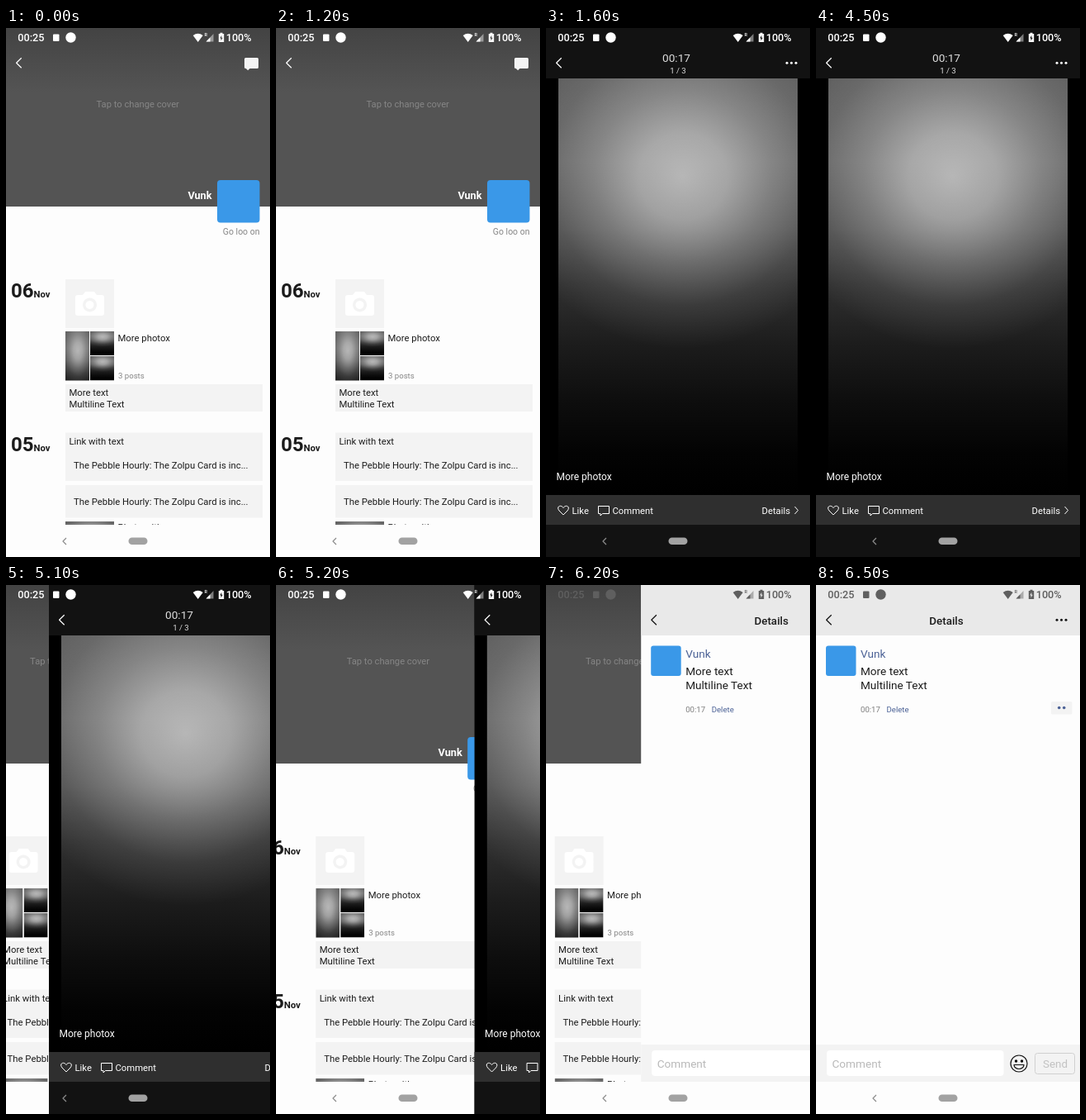
These frames come from a looping animation (320 px wide and 640 px high, 8000 ms). An HTML page:

```html
<!DOCTYPE html>
<html lang="en">
<head>
<meta charset="utf-8">
<title>Album, photo and details</title>
<style>
  html, body { margin: 0; width: 100%; height: 100%; overflow: hidden; background: #fdfdfd; }
  svg { display: block; }
  #stage { width: 100vw; height: 100vh; }
  text { font: 11.3px Roboto, "Liberation Sans", sans-serif; fill: #1c1c1c; }
  .line { fill: none; stroke: currentColor; stroke-width: 1.2; stroke-linejoin: round; }
  .thin { stroke-width: 1; }
  .mid { text-anchor: middle; }
  .end { text-anchor: end; }
  .day { font-size: 24px; font-weight: 700; }
  .month { font-weight: 700; }
  .large { font-size: 13.6px; }
  .small { font-size: 9.6px; }
  .tile { fill: #f3f3f3; }
  .avatar { fill: #3a98e8; }
  .light text { fill: #fff; }
  #status text { font-size: 12.7px; font-weight: 500; fill: currentColor; }
</style>
</head>
<body>
<svg id="stage" viewBox="0 0 320 640">
  <defs>
    <linearGradient id="cover" x2="0" y2="1">
      <stop stop-color="#434343"/>
      <stop offset=".36" stop-color="#545454"/>
    </linearGradient>
    <linearGradient id="fade" x2="0" y2="1">
      <stop stop-color="#5c5c5c"/>
      <stop offset=".2" stop-color="#5e5e5e"/>
      <stop offset=".36" stop-color="#4c4c4c"/>
      <stop offset=".5" stop-color="#303030"/>
      <stop offset=".64" stop-color="#1c1c1c"/>
      <stop offset=".78" stop-color="#0d0d0d"/>
      <stop offset=".9" stop-color="#030303"/>
      <stop offset="1" stop-color="#000"/>
    </linearGradient>
    <radialGradient id="glow" cx=".52" cy=".42" r=".74" gradientTransform="scale(1 .56)">
      <stop stop-color="#fff" stop-opacity=".56"/>
      <stop offset=".25" stop-color="#fff" stop-opacity=".46"/>
      <stop offset=".5" stop-color="#fff" stop-opacity=".25"/>
      <stop offset=".75" stop-color="#fff" stop-opacity=".08"/>
      <stop offset="1" stop-color="#fff" stop-opacity="0"/>
    </radialGradient>
    <symbol id="photo" viewBox="0 0 100 100" preserveAspectRatio="none">
      <rect width="100" height="100" fill="url(#fade)"/>
      <rect width="100" height="100" fill="url(#glow)"/>
    </symbol>
    <path id="back" class="line" d="M18.7 36.2 12.6 42.2l6.100 6"/>
    <g id="more" fill="currentColor">
      <circle cx="292" cy="42.2" r="1.5"/><circle cx="297.500" cy="42.2" r="1.5"/><circle cx="303" cy="42.2" r="1.5"/>
    </g>
    <clipPath id="content"><path d="M0 0H320V601H0z"/></clipPath>
  </defs>

  <g id="album">
    <rect width="320" height="640" fill="#fdfdfd"/>
    <g clip-path="url(#content)">
      <rect width="320" height="216" fill="url(#cover)"/>
      <g class="light" color="#fff">
        <use href="#back"/>
        <path fill="#f4f4f4" d="M290.5 36h14q1.5 0 1.5 1.5v10q0 1.5-1.5 1.5h-9l-2.3 2.3-2.3-2.3h-.4q-1.5 0-1.5-1.5v-10q0-1.5 1.5-1.5z"/>
        <text class="mid" x="159.7" y="96" style="font-size:11.2px;fill:#868686">Tap to change cover</text>
        <text class="end" x="249.5" y="207" style="font-size:12.7px;font-weight:700">Vunk</text>
      </g>
      <rect class="avatar" x="256" y="184" width="51.5" height="51.5" rx="4"/>
      <text class="end" x="307.5" y="250" style="font-size:10.5px;fill:#858585">Go loo on</text>

      <text class="day" x="6" y="326">06</text><text class="month" x="33.5" y="326">Nov</text>
      <rect class="tile" x="72" y="304" width="59" height="59"/>
      <path fill="#fff" fill-rule="evenodd" d="M87 323h6l3-4h11l3 4h6q3 0 3 3v19q0 3-3 3H87q-3 0-3-3v-19q0-3 3-3zm14.5 3.5a8.500 8.500 0 1 0 .1 0zm0 3.5a5 5 0 1 1-.1 0z"/>
      <svg x="72" y="367" width="29" height="59.5"><use href="#photo" width="29" height="100"/></svg>
      <use href="#photo" x="102" y="367" width="29" height="29"/>
      <use href="#photo" x="102" y="397" width="29" height="29.5"/>
      <text x="135.5" y="379">More photox</text>
      <text class="small" x="136" y="424" style="fill:#858585">3 posts</text>
      <rect class="tile" x="72" y="431" width="239" height="33"/>
      <text x="76.5" y="444.5">More text</text><text x="76.5" y="458.5">Multiline Text</text>

      <text class="day" x="6" y="512">05</text><text class="month" x="33.5" y="512">Nov</text>
      <rect class="tile" x="72" y="489.5" width="239" height="58.5"/>
      <text x="76.5" y="503.5">Link with text</text>
      <text x="82" y="533">The Pebble Hourly: The Zolpu Card is inc...</text>
      <rect class="tile" x="72" y="553" width="239" height="39.5"/>
      <text x="82" y="577">The Pebble Hourly: The Zolpu Card is inc...</text>
      <use href="#photo" x="72" y="597" width="59" height="59"/>
      <text x="135.5" y="608">Photo with</text>
    </g>
  </g>

  <g id="viewer" class="light" color="#fff">
    <rect width="320" height="640"/>
    <rect width="320" height="61" fill="#121212"/>
    <use href="#back"/><use href="#more"/>
    <text class="mid" x="158" y="41" style="font-size:13.6px;fill:#ddd">00:17</text>
    <text class="mid small" x="160" y="55" style="fill:#ddd">1 / 3</text>
    <use href="#photo" x="15" y="61" width="290" height="504"/>
    <text x="12.5" y="547" style="font-size:12px">More photox</text>
    <rect y="565" width="320" height="36" fill="#2f2f2f"/>
    <path class="line thin" d="M21 589l-5-5c-4-5 2-8 5-3.500 3-4.500 9-1.500 5 3.500z"/>
    <text x="31.5" y="587.5">Like</text>
    <path class="line thin" d="M63.5 578.5h13v9h-8l-2.5 2.5v-2.5h-2.5z"/>
    <text x="80.5" y="587.5">Comment</text>
    <text x="261.5" y="587.5">Details</text>
    <path class="line thin" d="M301.5 579l4 4.5-4 4.5"/>
    <rect y="601" width="320" height="39" fill="#121212"/>
  </g>

  <g id="details" color="#111">
    <rect width="320" height="640" fill="#fdfdfd"/>
    <rect width="320" height="61" fill="#e9e9e9"/>
    <use href="#back"/><use href="#more"/>
    <text class="mid" x="158" y="47.5" style="font-size:13.4px;font-weight:500">Details</text>
    <rect class="avatar" x="12" y="73.5" width="36.5" height="36.5" rx="3"/>
    <text class="large" x="54" y="88" style="fill:#4c6296">Vunk</text>
    <text class="large" x="54" y="108.5">More text</text><text class="large" x="54" y="126">Multiline Text</text>
    <text class="small" x="54" y="154" style="fill:#7c7c7c">00:17</text>
    <text class="small" x="85.5" y="154" style="fill:#4c6296">Delete</text>
    <rect class="tile" x="285" y="141" width="25.5" height="15.5" rx="1.5"/>
    <g fill="#4c6296"><circle cx="294.7" cy="148.5" r="1.8"/><circle cx="300.7" cy="148.5" r="1.8"/></g>
    <rect class="tile" y="556" width="320" height="45"/>
    <rect x="13" y="563" width="214.5" height="31" rx="4" fill="#fff"/>
    <text class="large" x="19.5" y="584" style="fill:#b9b9b9">Comment</text>
    <circle class="line" cx="246" cy="579" r="10"/>
    <circle cx="242.5" cy="576" r="1.7"/><circle cx="249.5" cy="576" r="1.7"/>
    <path class="line" d="M240 580.5h12a6 5 0 0 1-12 0z"/>
    <rect x="265.5" y="566.5" width="48" height="25" rx="3" fill="none" stroke="#d0d0d0"/>
    <text class="mid" x="290" y="584" style="font-size:13.4px;fill:#c2c2c2">Send</text>
  </g>

  <g id="status" fill="currentColor">
    <text x="14.3" y="15.7">00:25</text>
    <rect x="57" y="7.5" width="7.5" height="8.5" rx="1"/>
    <circle cx="78.5" cy="11.5" r="6.2"/>
    <path d="M226.7 9q6-4.500 12 0l-6 8z"/>
    <text x="240.5" y="9.5" style="font-size:5.5px">R</text>
    <path d="M251.5 7v9.5h-9z" opacity=".45"/><path d="M247.5 11.5v5h-5z"/>
    <path fill-rule="evenodd" d="M259.5 7V5.8h3V7h1.700v10h-6.400V7zm1.800 1.800-2 3.700h1.300v3l2.100-3.800h-1.400z"/>
    <text x="266.7" y="15.7">100%</text>
  </g>
  <g color="#8c8c8c">
    <path class="line" d="M73 617l-4 4 4 4"/>
    <rect x="148.5" y="616.5" width="23" height="8.5" rx="4.25" fill="#a2a2a2"/>
  </g>
</svg>
<script>
  const LOOP = 8000, STEP = 100, WIDTH = 320, PARALLAX = 0.3;
  const byId = id => document.getElementById(id);
  const [album, viewer, details, status] = ['album', 'viewer', 'details', 'status'].map(byId);

  const progress = (t, from, to) => Math.min(1, Math.max(0, (t - from) / (to - from)));
  const easeOut = (k, power) => 1 - (1 - k) ** power;
  const shift = (node, x) => node.setAttribute('transform', `translate(${x.toFixed(2)} 0)`);

  // Slides in, then is dragged aside slowly and released.
  function viewerX(t) {
    if (t < 4500) return WIDTH * (1 - easeOut(progress(t, 1200, 1600), 2));
    const dragged = 52 * progress(t, 4500, 5100) ** 2;
    return dragged + (WIDTH - 52) * easeOut(progress(t, 5100, 5400), 3);
  }

  const detailsX = t => WIDTH * (1 - easeOut(progress(t, 6000, 6500), 2));

  function draw(t) {
    const photo = viewerX(t), post = detailsX(t);
    shift(viewer, photo);
    shift(details, post);
    shift(album, -PARALLAX * (WIDTH - Math.min(photo, post)));
    status.setAttribute('color', post < WIDTH ? '#5f5f5f' : '#fff');
  }

  const start = performance.now();
  function tick() {
    const t = (performance.now() - start) % LOOP;
    draw(Math.floor(t / STEP) * STEP);
    requestAnimationFrame(tick);
  }
  tick();
</script>
</body>
</html>
```
